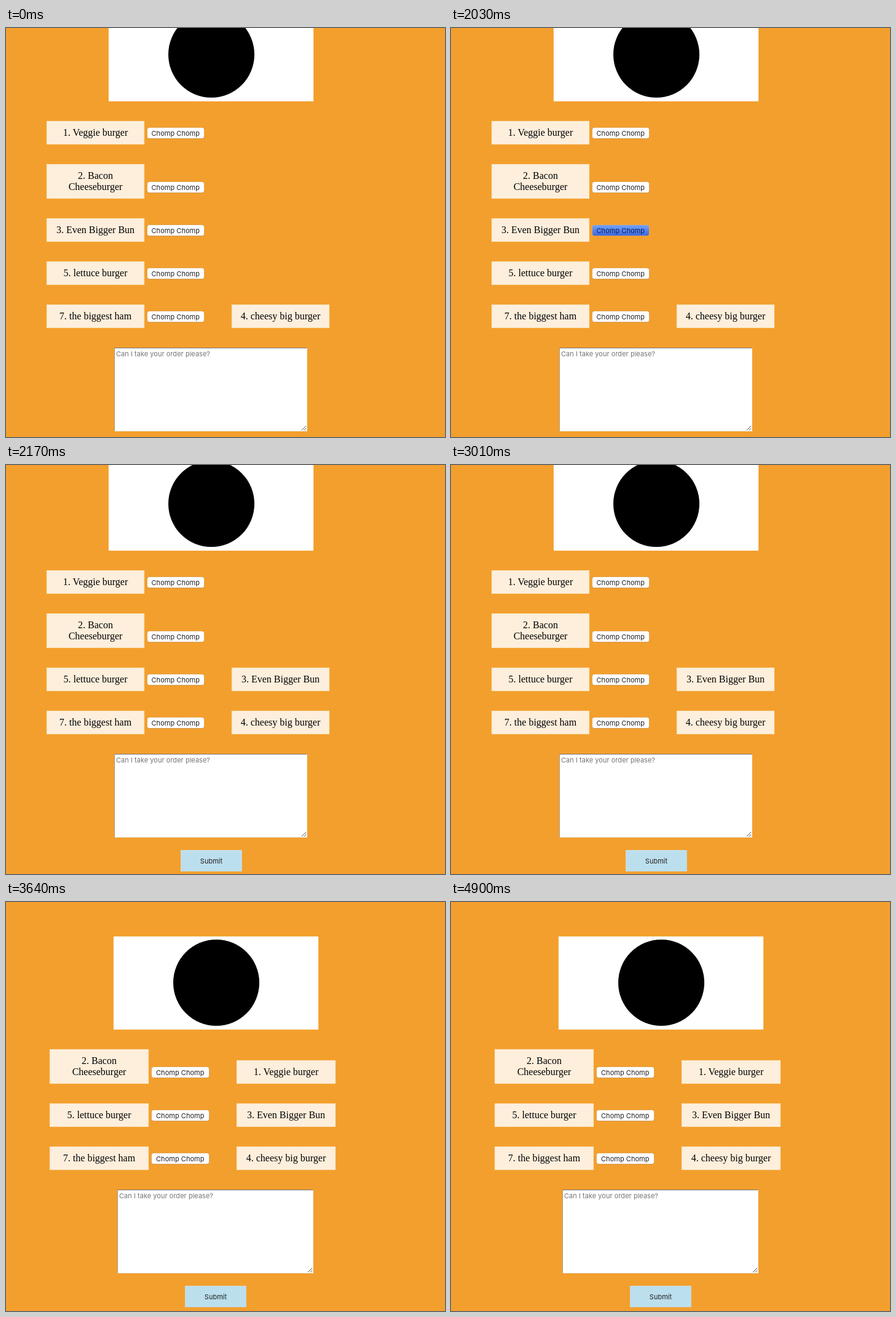
An HTML page for the animation above (4.97 s loop, 714 by 664 pixels).

```html
<!DOCTYPE html>
<html lang="en">
<head>
<meta charset="utf-8">
<title>Burger orders</title>
<style>
  html, body { margin: 0; width: 100%; height: 100%; overflow: hidden; background: #f39f2d; }
  body { position: relative; }
  .page, .page * { position: absolute; box-sizing: border-box; }
  .page { inset: 0; animation: 4970ms step-end infinite; }
  .full { animation-name: full; transform: translateY(-88px); }
  .eaten { animation-name: eaten; }
  .last { animation-name: last; }

  .logo { top: 56px; width: 333px; height: 151px; background: #fff; box-shadow: 0 0 1px #fff8; }
  .logo i { left: 97px; top: 5px; width: 140px; height: 140px; border-radius: 50%; background: #000; }

  .item {
    padding: 9px 0; border: 1px solid #fae6c0; background: #fdefdc; color: #000;
    box-shadow: 0 0 1px #fdefdc88;
    font: 16px/18px "Liberation Serif", Times, serif; text-align: center; white-space: pre;
  }
  .chomp, .order, .submit { font: 11px/18px Inter, sans-serif; letter-spacing: .03px; }
  .chomp {
    height: 17px; border-radius: 3.5px; background: #fff; color: #222;
    box-shadow: 0 0 0 .5px #d8ae74, 0 .5px 1px #a98a60; text-align: center; white-space: nowrap;
  }
  .press { animation: press 4970ms step-end infinite; }
  .order {
    height: 136px; padding: 0 2px; background: #fff; color: #757575;
    border: 1px solid; border-color: #777 #f3e9d8 #e6dccb #a59a88;
  }
  .order svg { right: 0; bottom: 0; stroke: #555; }
  .submit {
    width: 100px; height: 35px; background: #bcdfee; color: #222; line-height: 34px;
    border: 1px solid; border-color: #cfdcd6 #c6d0c4 #c6d0c4 #cfdcd6; text-align: center;
  }

  @keyframes full { 0% { visibility: visible } 42.25%, 100% { visibility: hidden } }
  @keyframes eaten {
    0% { visibility: hidden; transform: none }
    42.25% { visibility: visible; transform: none }
    43.66% { visibility: visible; transform: translateY(-68px) }
    73.23%, 100% { visibility: hidden; transform: none }
  }
  @keyframes last { 0% { visibility: hidden } 73.23%, 100% { visibility: visible } }
  @keyframes press {
    0% { background: #fff; color: #222 }
    40.84% { background: linear-gradient(#74a2f6, #3b68df); color: #0b1f5c }
    42.25%, 100% { background: #fff; color: #222 }
  }
</style>
</head>
<body>
<script>
  const veggie = '1. Veggie burger', bacon = '2. Bacon\nCheeseburger', bigger = '3. Even Bigger Bun',
        cheesy = '4. cheesy big burger', lettuce = '5. lettuce burger', biggest = '7. the biggest ham';

  const narrow = { logo: 166.5, left: 66, right: 367, item: 159, chomp: 229.5, chompW: 92.5, order: 176, orderW: 314, submit: 284 };
  const wide = { logo: 174.5, left: 71, right: 375, item: 161, chomp: 236.5, chompW: 93.5, order: 181, orderW: 319, submit: 291 };

  function box(parent, cls, x, y, w, text = '') {
    const el = document.createElement('div');
    el.className = cls;
    el.style.left = x + 'px';
    if (y !== null) el.style.top = y + 'px';
    if (w) el.style.width = w + 'px';
    el.textContent = text;
    parent.append(el);
    return el;
  }

  const height = text => text.includes('\n') ? 56 : 38;

  // Each row is [uneaten burger, eaten burger]; both share a bottom edge.
  function page(cls, grid, rows, pressed) {
    const root = box(document.body, 'page ' + cls, 0, 0);
    box(root, 'logo', grid.logo, null).append(document.createElement('i'));
    let y = 239;
    for (const [burger, eaten] of rows) {
      const bottom = y + height(burger);
      box(root, 'item', grid.left, y, grid.item, burger);
      box(root, burger === pressed ? 'chomp press' : 'chomp', grid.chomp, bottom - 27, grid.chompW, 'Chomp Chomp');
      if (eaten) box(root, 'item', grid.right, bottom - height(eaten), grid.item, eaten);
      y = bottom + 32;
    }
    const order = box(root, 'order', grid.order, y, grid.orderW, 'Can I take your order please?');
    order.insertAdjacentHTML('beforeend', '<svg width="9" height="9"><path d="M1 8L8 1M5 8L8 5"/></svg>');
    box(root, 'submit', grid.submit, y + 156, 0, 'Submit');
  }

  page('full', narrow, [[veggie], [bacon], [bigger], [lettuce], [biggest, cheesy]], bigger);
  page('eaten', narrow, [[veggie], [bacon], [lettuce, bigger], [biggest, cheesy]]);
  page('last', wide, [[bacon, veggie], [lettuce, bigger], [biggest, cheesy]]);
</script>
</body>
</html>
```
